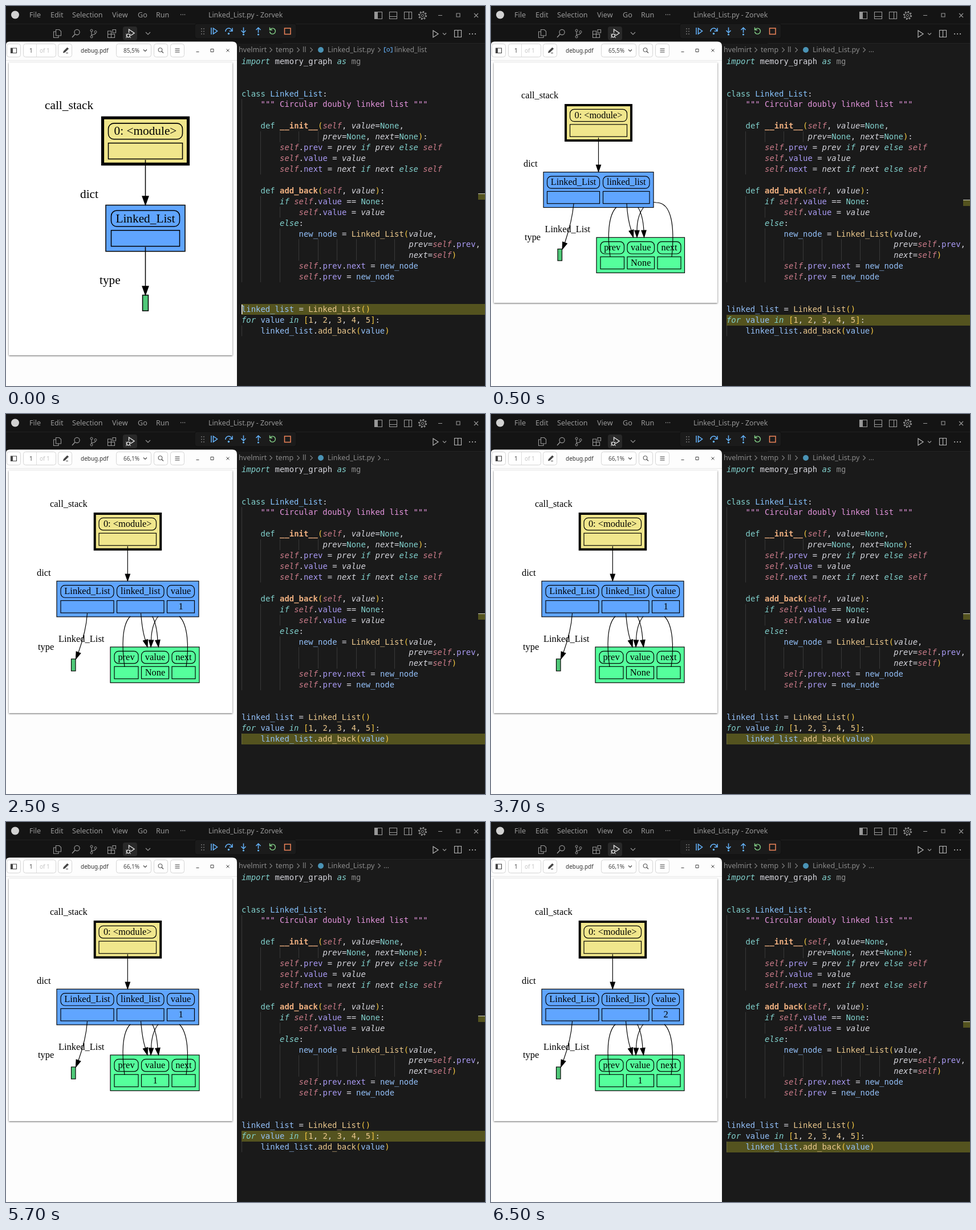
Write an HTML page that moves like this. It is 840x667 px and loops after 8 s.

```html
<!DOCTYPE html>
<html lang="en">
<head>
<meta charset="utf-8">
<style>
html, body { margin: 0; width: 100%; height: 100%; overflow: hidden; background: #1a1a1a }
svg { display: block; width: 840px; height: 667px }
svg, .ui { font: 12.6px "Noto Sans", sans-serif }
text { white-space: pre }
.small { font-size: 10px }
.code { font: 13.92px "DejaVu Sans Mono", monospace; fill: #d6d6dd }
.graph { font-family: "Liberation Serif", serif }
.str { fill: #e394dc }
.fn { fill: #efb080; font-weight: bold }
.var { fill: #94c1fa }
.cls { fill: #87c3ff }
.def { fill: #82d2ce }
.key { fill: #82d2ce; font-style: italic }
.self { fill: #cc7c8a; font-style: italic }
.prop { fill: #aa9bf5 }
.call { fill: #ebc88d }
.dim { fill: #8b8b8b }
.arg { font-style: italic }
.par { fill: #f5c842 }
</style>
</head>
<body>
<svg id="stage" viewBox="0 0 840 667"></svg>
<script>
const stage = document.getElementById('stage');
const LEFT = 413, CH = 8.38, LINE = 18.92, TOP = 87.6;

// ---- drawing helpers ----
const rect = (x0, y0, x1, y1, fill, more = '') =>
  `<rect x="${x0}" y="${y0}" width="${x1 - x0}" height="${y1 - y0}" fill="${fill}" ${more}/>`;
const text = (x, y, s, more = '') => `<text x="${x}" y="${y}" ${more}>${s.replace(/<(?!\/?tspan)/g, '&lt;')}</text>`;
const path = (d, color, width = 1.1, fill = 'none') =>
  `<path d="${d}" stroke="${color}" stroke-width="${width}" fill="${fill}"/>`;
const dot = (x, y, r, fill) => `<circle cx="${x}" cy="${y}" r="${r}" fill="${fill}"/>`;
const ring = (x, y, r, color, width = 1, more = '') =>
  `<circle cx="${x}" cy="${y}" r="${r}" fill="none" stroke="${color}" stroke-width="${width}" ${more}/>`;

// ---- source code panel ----
const code = `import memory_graph as mg


class Linked_List:
    """ Circular doubly linked list """

    def __init__(self, value=None,
                 prev=None, next=None):
        self.prev = prev if prev else self
        self.value = value
        self.next = next if next else self

    def add_back(self, value):
        if self.value == None:
            self.value = value
        else:
            new_node = Linked_List(value,
                                   prev=self.prev,
                                   next=self)
            self.prev.next = new_node
            self.prev = new_node


linked_list = Linked_List()
for value in [1, 2, 3, 4, 5]:
    linked_list.add_back(value)`.split('\n');

const rules = {
  str: '""".*"""',
  fn: '(?<=def )\\w+',
  cls: '(?<=class )\\w+',
  def: '\\b(?:class|def|None)\\b',
  key: '\\b(?:import|as|if|else|for|in)\\b',
  self: '\\bself\\b',
  prop: '(?<=\\.)(?:prev|value|next)\\b',
  call: '\\b(?:Linked_List|add_back|\\d)\\b',
  var: '\\b(?:linked_list|new_node|value(?= in|\\)$))\\b',
  dim: '\\bmg\\b',
  arg: '\\b(?:prev|value|next)\\b',
  par: '[()[\\]]'
};
const lexer = new RegExp(Object.entries(rules).map(([k, r]) => `(?<${k}>${r})`).join('|'), 'g');

function paint(line) {
  return line.trimStart().replace(lexer, (...m) => {
    const groups = m[m.length - 1];
    const kind = Object.keys(groups).find(k => groups[k] !== undefined);
    return `<tspan class="${kind}">${m[0]}</tspan>`;
  });
}

const listing = code.map((line, i) => text(
  LEFT + CH * (line.length - line.trimStart().length), TOP + LINE * i + 14.2, paint(line), 'class="code"')).join('');

// column, first line, last line
const guides = [
  [0, 4, 20], [0, 25, 25], [4, 7, 10], [4, 13, 20], [8, 7, 7], [8, 14, 14], [8, 16, 20], [12, 7, 7], [16, 7, 7],
  ...[12, 16, 20, 24, 28, 32].map(c => [c, 17, 18])
].map(([c, a, b]) => {
  const x = Math.floor(LEFT + c * CH) + .5;
  return path(`M${x} ${TOP + a * LINE}V${TOP + (b + 1) * LINE}`, '#ffffff22', 1);
}).join('');

// ---- editor chrome ----
const gray = '#989898', pale = '#b8b8b8', lit = '#e6e6e6', blue = '#66b5ff', crumb = '#8a8a8a';
const menus = [[41, 'File'], [78, 'Edit'], [116, 'Selection'], [186, 'View'], [231, 'Go'], [263, 'Run'], [305, '···']];
const crumbs = [[408, 'hvelmirt'], [473, 'temp'], [520, 'll'], [564, 'Linked_List.py']];
const chevron = x => path(`M${x - 2.5} 73l4 4-4 4`, '#808080');
const down = (x, y, s, color) => path(`M${x - s} ${y - s / 2}l${s} ${s} ${s}-${s}`, color);

const chrome = [
  rect(0, 0, 840, 66, '#141414'),
  path('M0 31.5H840', '#202020', 1),
  path('M485 65.5H840', '#242424', 1),
  dot(16, 15.5, 7, '#d2d2d2'),
  ...menus.map(([x, s]) => text(x, 20, s, `fill="${gray}"`)),
  text(355, 20, 'Linked_List.py - Zorvek', `fill="${gray}" font-size="12.3"`),
  path('M646.5 10.5h13v12h-13zM672.5 10.5h13v12h-13zM672.5 18.5h13M698.5 10.5h13v12h-13zM706.5 10.5v12', gray),
  rect(647, 11, 652, 22, gray),
  ring(730.5, 16.5, 6.6, gray, 2, 'stroke-dasharray="2.6 2.58"'),
  ring(730.5, 16.5, 5, gray), ring(730.5, 16.5, 2, gray),
  path('M758 16.5h7M790 13h6v6h-6zM821 13l7 7M828 13l-7 7', gray),
  // activity icons
  path('M87.5 41.5h6l3 3v7.5h-9zM87.5 45h-4v10.5h8.5v-3.5', gray),
  path('M121 49.5l-5 5.5', gray, 1.4), ring(124.5, 46, 4.6, gray, 1.2),
  ...[[150, 43], [150, 54], [157, 45.5]].map(([x, y]) => ring(x, y, 2, gray)),
  path('M150 45v7M157 47.5c0 4-7 1.5-7 4.5', gray),
  path('M178.5 44h6v11.5h-6zM178.5 49.5h12v6h-12M187 41.5h5.5v5.5h-5.5z', gray),
  rect(205, 36, 230, 60, '#292929', 'rx="4"'),
  path('M215.5 47v-6l9.5 6.5-6.5 4.5', lit, 1.4),
  ring(214.5, 52, 2.8, lit, 1.3),
  path('M210 49l2 1.5M210 52.5h2M210 56l2-1.5M219 49l-2 1.5M219 56l-2-1.5', lit, 1),
  down(249, 48, 4, gray),
  // debug controls
  rect(331, 31, 509, 57, '#1b1b1b', 'rx="4" stroke="#101010"'),
  ...[0, 1, 2, 3, 4, 5].map(i => dot(343 + i % 2 * 4, 40 + (i >> 1) * 4.5, 1, '#777')),
  path('M360 38v12M363.5 39l7 5-7 5z', blue, 1.5),
  path('M385 45a5.5 5.5 0 0 1 11-1M397 38.5v5.5h-5.5', blue, 1.5), dot(390.5, 48.5, 1.7, blue),
  path('M416.5 37.5v9M412.5 43l4 4 4-4', blue, 1.5), dot(416.5, 50, 1.6, blue),
  path('M442.5 47v-9M438.5 42l4-4 4 4', blue, 1.5), dot(442.5, 50, 1.6, blue),
  path('M463.5 41a5 5 0 1 1-1 4M462.5 37.5v4.5h4.5', '#83cf87', 1.4),
  path('M488.5 39h10.5v10.5h-10.5z', '#f0855a', 1.5),
  path('M749 43l9 6-9 6z', pale, 1.2), down(769, 49, 3, gray),
  path('M786.5 42.5h12v12h-12zM792.5 42.5v12', pale),
  ...[813, 818, 823].map(x => dot(x, 49, 1.1, pale)),
  // breadcrumb
  ...crumbs.map(([x, s]) => text(x, 81, s, `fill="${crumb}"`)),
  ...[465, 513, 536, 655].map(chevron),
  dot(552, 77, 5, '#4a93b5')
].join('');

const symbol = path('M666.5 73h-3v8h3M674 73h3v8h-3', blue) + ring(670.3, 77, 2.5, blue) +
  text(681, 81, 'linked_list', `fill="${crumb}" font-size="12.3"`);

// ---- viewer window ----
const ink = '#444';
const button = (x0, x1) => rect(x0 + .5, 66.5, x1 - .5, 89.5, '#fff', 'rx="4" stroke="#d5d5d5"');
const small = (x, s, color, more = '') => text(x, 81.5, s, `class="ui small" fill="${color}" ${more}`);
const viewer = [
  '<path d="M0 667V68.5q0-6 6-6H397q8 0 8 8V667z" fill="#fdfdfd"/>',
  path('M0 95.5H405', '#e6e6e6', 1),
  button(1, 26), button(30, 88), button(91, 116), button(193, 255), button(259, 284), button(288, 313),
  path('M8.5 74h10v8.5h-10z', ink), rect(8, 74, 12, 82.5, ink),
  path('M53.5 67v22', '#ddd', 1),
  small(41, '1', ink), small(59, 'of 1', '#c4c4c4'),
  path('M100.5 82l1-3 6-6 2 2-6 6zM105 82.5h4', ink, 1, ink),
  small(131, 'debug.pdf', '#333', 'font-weight="bold"'),
  down(244, 78, 3, ink),
  ring(270.5, 77, 3.5, ink), path('M273 79.5l3 3', ink),
  path('M296.5 75h8M296.5 78h8M296.5 81h8M333.5 80.5h5M359 75.5h5v5h-5zM386.5 75.5l5 5M391.5 75.5l-5 5', ink, 1)
].join('');

const page = (bottom, zoom) =>
  rect(5, 99, 397, bottom, '#fff', 'style="filter:drop-shadow(0 1px 1.5px #0009)"') + small(206, zoom + '%', ink);

// ---- memory graph ----
const KHAKI = '#f0e68c', BLUE = '#60a5ff', MINT = '#55ff9c', GREEN = '#50c878', BOLD = 3.4;

function graph(fs) {
  const thin = fs / 14, pen = `stroke="#000" stroke-width="${thin}"`;
  const label = (x, y, s, more = '') => text(x, y, s, `font-size="${fs}" ${more}`);
  const line = d => path(d, '#000', thin);
  return {
    label, line,
    leaf: (x0, y0, x1, y1) => rect(x0, y0, x1, y1, GREEN, pen),
    // cells: [left, right, key, value]
    node: (x0, y, x1, fill, cells, weight = 1) =>
      rect(x0, y, x1, y + fs * 3.81, fill, `stroke="#000" stroke-width="${thin * weight}"`) +
      cells.map(([a, b, key, value = '']) => {
        const mid = 'text-anchor="middle"', c = (a + b) / 2;
        return rect(a, y + fs * .45, b, y + fs * 1.76, 'none', `rx="${fs * .45}" ${pen}`) +
          rect(a, y + fs * 2.08, b, y + fs * 3.39, 'none', pen) +
          label(c, y + fs * 1.41, key, mid) + label(c, y + fs * 3.05, value, mid);
      }).join(''),
    // head runs from (x, y) to its tip
    arrow(d, x, y, tx, ty) {
      const n = Math.hypot(tx - x, ty - y), u = (tx - x) / n * fs / 4, v = (ty - y) / n * fs / 4;
      return line(`${d} ${x} ${y}`) + path(`M${x - v} ${y + u}L${tx} ${ty}L${x + v} ${y - u}z`, '#000', thin, '#000');
    }
  };
}

function emptyScene() {
  const g = graph(21.3);
  return page(613, '85,5') + g.label(68, 181, 'call_stack') + g.label(130, 337, 'dict') + g.label(164, 487.5, 'type') +
    g.node(169.5, 196.3, 319.5, KHAKI, [[179.5, 309.5, '0: <module>']], BOLD) +
    g.node(175, 349.5, 314, BLUE, [[184.5, 304.5, 'Linked_List']]) +
    g.leaf(239.5, 507.5, 249.5, 535) +
    g.arrow('M244.5 270L', 244.5, 334, 244.5, 349) + g.arrow('M244.5 423L', 244.5, 492, 244.5, 507);
}

function listScene() {
  const g = graph(16.3);
  return page(521, '65,5') + g.label(53, 162, 'call_stack') + g.label(57, 282, 'dict') + g.label(59, 411, 'type') +
    g.label(94.5, 397, 'Linked_List') +
    g.node(131, 174, 246, KHAKI, [[138.5, 238.5, '0: <module>']], BOLD) +
    g.node(92, 291.5, 285, BLUE, [[98.5, 190.5, 'Linked_List'], [196.5, 278, 'linked_list']]) +
    g.node(185, 406.3, 339.5, MINT, [[192, 233.5, 'prev'], [239, 286.5, 'value', 'None'], [292, 333, 'next']]) +
    g.leaf(117, 426.5, 124.5, 447) +
    g.arrow('M188.5 231L', 188.5, 279, 188.5, 291) +
    g.arrow('M145 347C143 371 136 396', 129.5, 415.5, 125, 427) +
    g.arrow('M238 347C239 365 242 382', 246, 394, 249.5, 406) +
    g.arrow('M268 353C260 363 256 378', 256, 394, 256, 406) +
    g.arrow('M257.5 353C264 363 267 378', 268, 394, 268.5, 406) +
    g.line('M209 440C204 405 205 368 220 353') + g.line('M317 440C322 390 318 345 290 345L285 344.5');
}

function loopScene(value, stored) {
  const g = graph(16.45);
  return page(525, '66,1') + g.label(77, 163, 'call_stack') + g.label(54, 284, 'dict') + g.label(56, 414, 'type') +
    g.label(92, 399.5, 'Linked_List') +
    g.node(155.7, 175, 271.2, KHAKI, [[163, 263.5, '0: <module>']], BOLD) +
    g.node(89, 293.3, 338, BLUE, [[96, 189, 'Linked_List'], [194.5, 277, 'linked_list'], [282.5, 330.5, 'value', value]]) +
    g.node(183, 409, 339, MINT, [[190, 232, 'prev'], [237.5, 285.5, 'value', stored], [291, 332, 'next']]) +
    g.leaf(114.5, 430, 122, 451) +
    g.arrow('M213.3 232L', 213.3, 281, 213.3, 293) +
    g.arrow('M142.5 350C141 374 134 399', 127, 418.5, 122.5, 430) +
    g.arrow('M236.5 350C238 368 240 384', 244.5, 397, 248, 409) +
    g.arrow('M267 355C259 365 255 380', 254.5, 397, 254, 409) +
    g.arrow('M256.5 355C262 365 265 380', 266, 397, 267.5, 409) +
    g.line('M208 444C203 408 203 370 218 355') + g.line('M316 444C321 408 319 370 304 355');
}

// ---- timeline: start time, current line, graph ----
const steps = [
  [0, 23, emptyScene()],
  [500, 24, listScene()],
  [2500, 25, loopScene('1', 'None')],
  [4500, 24, loopScene('1', '1')],
  [6500, 25, loopScene('2', '1')]
];

function draw([start, line, scene]) {
  const y = Math.round(TOP + line * LINE), mark = Math.round(329 + 10.6 * (line - 23));
  stage.innerHTML =
    rect(LEFT, y, 840, y + 19, '#54531f') + guides + listing + chrome +
    (start ? text(662, 81, '…', `fill="${crumb}"`) : symbol + rect(LEFT, y + 1, LEFT + 1.5, y + 18, '#fff')) +
    rect(828, mark, 840, mark + 11, '#54531f') + rect(828, mark, 840, mark + 1, '#d0d0c0') +
    viewer + `<g class="graph">${scene}</g>`;
}

let shown;
function tick() {
  const t = performance.now() % 8000;
  const step = steps.findLast(s => s[0] <= t);
  if (step !== shown) draw(shown = step);
  requestAnimationFrame(tick);
}
tick();
</script>
</body>
</html>
```
